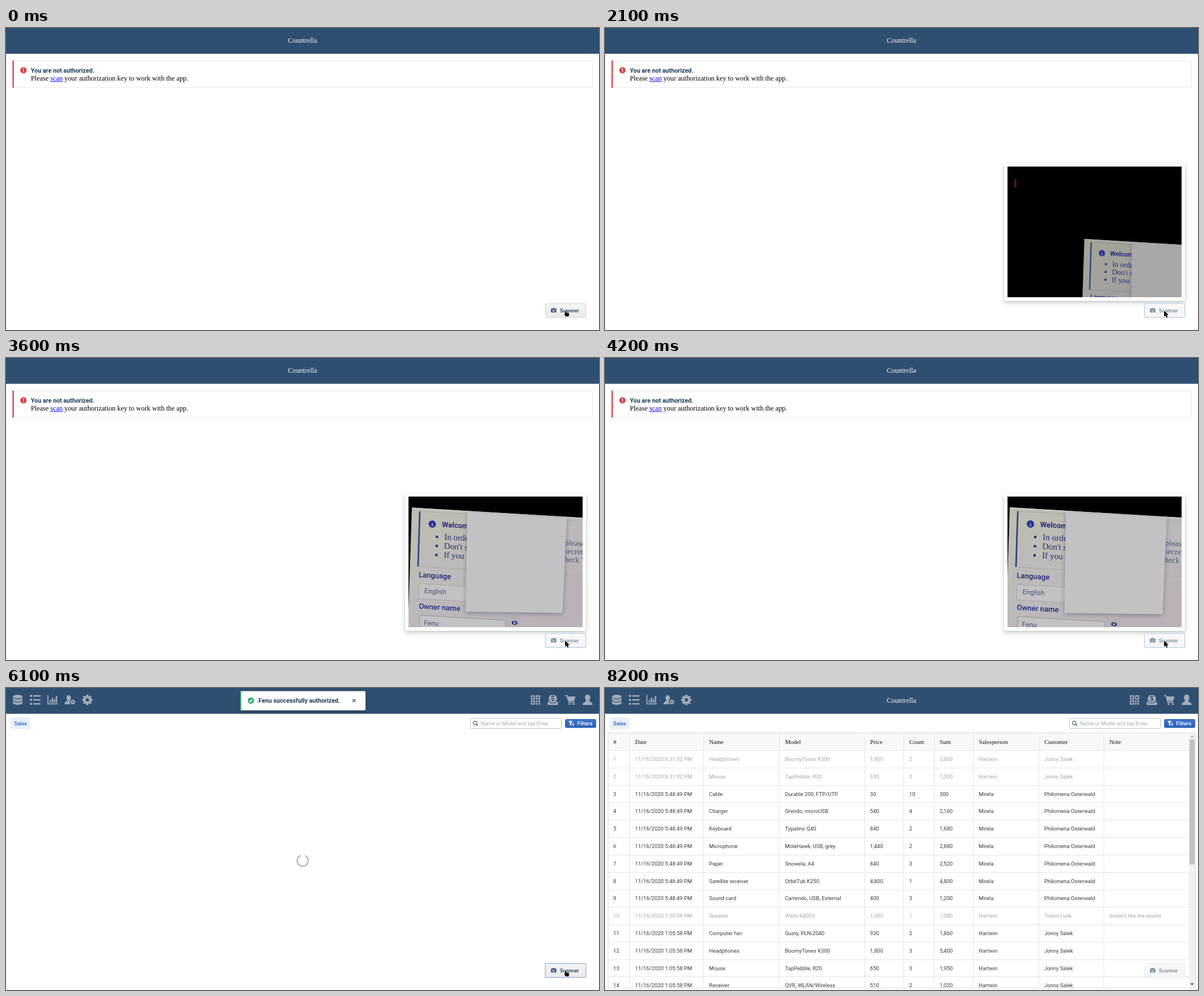
Animation of 1049 by 534 pixels, one loop 8900 ms. Source, as an HTML page with a canvas:

```html
<!DOCTYPE html>
<html lang="en">
<head>
<meta charset="utf-8">
<title>Sales scanner</title>
<style>
  html, body { margin: 0; width: 100%; height: 100%; overflow: hidden; background: #fff; }
  canvas { display: block; width: 100vw; height: 100vh; }
</style>
</head>
<body>
<canvas id="stage" width="1049" height="534"></canvas>
<script>
const ctx = document.getElementById('stage').getContext('2d');
const LOOP = 8900;
const SANS = 'Roboto, sans-serif';
const SERIF = '"Liberation Serif", serif';
const NAVY = '#2f4f72', ICON = '#a3aeba', INK = '#263f58', BLUE = '#2f66c0';
const TAU = Math.PI * 2;

// ---------- helpers ----------
function rect(x, y, w, h, color) {
  ctx.fillStyle = color;
  ctx.fillRect(x, y, w, h);
}

function box(x, y, w, h, r, fill, stroke) {
  ctx.beginPath();
  ctx.roundRect(x, y, w, h, r);
  if (fill) { ctx.fillStyle = fill; ctx.fill(); }
  if (stroke) { ctx.strokeStyle = stroke; ctx.lineWidth = 1; ctx.stroke(); }
}

function dot(x, y, r, color, ry = r) {
  ctx.beginPath();
  ctx.ellipse(x, y, r, ry, 0, 0, TAU);
  ctx.fillStyle = color;
  ctx.fill();
}

function shape(d, color) {
  ctx.fillStyle = color;
  ctx.fill(new Path2D(d));
}

function line(d, color, width) {
  ctx.strokeStyle = color;
  ctx.lineWidth = width;
  ctx.stroke(new Path2D(d));
}

function text(str, x, y, font, color, align = 'left') {
  ctx.font = font;
  ctx.textAlign = align;
  ctx.fillStyle = color;
  ctx.fillText(str, x, y);
  return ctx.measureText(str).width;
}

function at(x, y, scale, draw) {
  ctx.save();
  ctx.translate(x, y);
  ctx.scale(scale, scale);
  draw();
  ctx.restore();
}

function withShadow(color, blur, dy, draw) {
  ctx.save();
  ctx.shadowColor = color;
  ctx.shadowBlur = blur;
  ctx.shadowOffsetY = dy;
  draw();
  ctx.restore();
}

// Last step time that is not later than t
const snap = (t, steps) => steps.reduce((last, s) => (s <= t ? s : last), steps[0]);

// ---------- icons, centred on 0,0 ----------
function database() {
  dot(0, -5.7, 8.5, ICON, 3.4);
  const band = 'M-8.5 -3.6Q0 2 8.5 -3.6V.6Q0 6.2 -8.5 .6Z';
  shape(band, ICON);
  at(0, 5.6, 1, () => shape(band, ICON));
}

function list() {
  for (const y of [-7, 0, 7]) {
    dot(-7.3, y, 2.1, ICON);
    rect(-3.5, y - 1.2, 13, 2.4, ICON);
  }
}

function chart() {
  rect(-9, -8.5, 1.8, 16.5, ICON);
  rect(-9, 6.2, 18.5, 1.8, ICON);
  [5, 9, 6.5, 12].forEach((h, i) => rect(-5 + i * 3.6, 5 - h, 2.4, h, ICON));
}

function person() {
  dot(0, -4, 4.8, ICON, 5.6);
  shape('M-8.5 9V7C-8 4.5 -4 4.5 -2.8 1H2.8C4 4.5 8 4.5 8.5 7V9Z', ICON);
}

function cog() {
  ctx.beginPath();
  ctx.arc(0, 0, 4.9, 0, TAU);
  ctx.strokeStyle = ICON;
  ctx.lineWidth = 4;
  ctx.stroke();
  for (let i = 0; i < 8; i++) {
    ctx.save();
    ctx.rotate(i * TAU / 8);
    rect(-1.9, -9.2, 3.8, 3.6, ICON);
    ctx.restore();
  }
}

function personCog() {
  at(-2.2, 0, .85, person);
  dot(5.2, 3.8, 5.6, NAVY);
  at(5.2, 3.8, .48, cog);
}

function tiles() {
  ctx.strokeStyle = ICON;
  ctx.lineWidth = 2;
  for (const [x, y] of [[-7, -7], [2, -7], [-7, 2]]) ctx.strokeRect(x, y, 5.4, 5.4);
  for (const [x, y] of [[1, 1], [5.4, 1], [1, 5.4], [5.4, 5.4]]) rect(x, y, 3, 3, ICON);
}

function coin() {
  shape('M-9 3H-7L-4 6H4L7 3H9V9H-9Z', ICON);
  dot(0, -2, 8.2, NAVY);
  dot(0, -2, 7.3, ICON);
  text('$', 0, 2.2, 'bold 12px ' + SANS, NAVY, 'center');
}

function cart() {
  line('M-9 -7.5H-6L-2.3 4H7.5', ICON, 1.8);
  shape('M-5.3 -6H9.2L7 2H-3Z', ICON);
  dot(-1.2, 7.3, 1.8, ICON);
  dot(6.2, 7.3, 1.8, ICON);
}

function camera(color) {
  box(-5, -3, 10, 7, 1, color);
  rect(-2.2, -4.2, 4.4, 2, color);
  dot(0, .5, 2.4, '#f4f5f6');
  dot(0, .5, 1.4, color);
}

function funnel() {
  shape('M-5 -4.2H2.2L-.4 -.8V4.2L-2.4 2.8V-.8Z', '#fff');
  for (let i = 0; i < 3; i++) rect(1.2, -.6 + i * 1.8, 3.6, 1, '#fff');
}

// ---------- page parts ----------
function header(signedIn) {
  rect(0, 0, 1049, 45, NAVY);
  rect(0, 45, 1049, 1, '#7f93aa');
  text('Countrella', 524.5, 26, '12.29px ' + SERIF, '#f5f8fa', 'center');
  if (!signedIn) return;
  [database, list, chart, personCog, cog].forEach((icon, i) => at(20.7 + i * 30.8, 21, 1, icon));
  [tiles, coin, cart, person].forEach((icon, i) => at(936.5 + i * 30.8, 21, 1, icon));
}

function callout() {
  box(12.5, 58.5, 1025, 46.5, 0, '#fff', '#e3e6e9');
  rect(11.5, 57.6, 2.3, 48, '#db3b41');
  dot(30.8, 74.8, 5.5, '#db3b41');
  rect(30, 71.5, 1.6, 4.2, '#fff');
  rect(30, 76.6, 1.6, 1.6, '#fff');
  text('You are not authorized.', 44, 78.6, 'bold 10.75px ' + SANS, '#1c3a56');
  const font = '12.29px ' + SERIF;
  let x = 44;
  x += text('Please ', x, 93, font, '#000');
  const link = text('scan', x, 93, font, '#0000ee');
  rect(x, 94.2, link, 1, '#0000ee');
  text(' your authorization key to work with the app.', x + link, 93, font, '#000');
}

function toolbar() {
  box(8.5, 52, 34.5, 21, 2, '#e9f0f8');
  text('Sales', 14.6, 66.4, '500 9.3px ' + SANS, BLUE);

  box(821.5, 53.5, 161, 18, 2, '#fff', '#b9c2ca');
  ctx.beginPath();
  ctx.arc(830, 61.8, 3.2, 0, TAU);
  ctx.strokeStyle = '#5c7080';
  ctx.lineWidth = 1.4;
  ctx.stroke();
  line('M832.3 64.2L835 67', '#5c7080', 1.7);
  text('Name or Model and tap Enter...', 840, 66.4, '9.21px ' + SANS, '#a3abb3');

  const fill = ctx.createLinearGradient(0, 55, 0, 70);
  fill.addColorStop(0, '#3f76cf');
  fill.addColorStop(1, '#2b5fb8');
  box(989.5, 55.5, 54, 14.5, 2, fill, '#2a5cb0');
  at(1000, 62.5, 1, funnel);
  text('Filters', 1010.5, 66.3, '500 9.6px ' + SANS, '#fff');
}

function spinner(t) {
  const gaps = { 4500: 0, 4800: 255, 5100: 75, 5500: 180, 5800: 200, 6100: 272 };
  const gap = gaps[snap(t, Object.keys(gaps).map(Number))] * TAU / 360;
  ctx.beginPath();
  ctx.arc(524.8, 305.3, 9.8, gap + .5, gap + TAU - .5);
  ctx.strokeStyle = '#aab4bd';
  ctx.lineWidth = 2.2;
  ctx.lineCap = 'round';
  ctx.stroke();
  ctx.lineCap = 'butt';
}

const COLUMNS = [
  ['#', 5], ['Date', 43.5], ['Name', 174.5], ['Model', 308.8], ['Price', 459.2], ['Count', 528.5],
  ['Sum', 582.3], ['Salesperson', 651.5], ['Customer', 767.3], ['Note', 882.5]
];

const ORDERS = [
  { time: '6:31:32', seller: 'Hartwin', buyer: 'Jonny Salek', dim: true, items: [
    ['Headphones', 'BoomyTones K300', 1800, 2],
    ['Mouse', 'TapPebble, R20', 650, 2]] },
  { time: '5:48:49', seller: 'Mirela', buyer: 'Philomena Osterwald', items: [
    ['Cable', 'Durable 200, FTP/UTP', 30, 10],
    ['Charger', 'Grendo, microUSB', 540, 4],
    ['Keyboard', 'Typalino Q40', 840, 2],
    ['Microphone', 'MoleHawk, USB, grey', 1440, 2],
    ['Paper', 'Snowela, A4', 840, 3],
    ['Satellite receiver', 'OrbitTub K250', 4800, 1],
    ['Sound card', 'Carrendo, USB, External', 400, 3]] },
  { time: '1:20:06', seller: 'Hartwin', buyer: 'Toben Lusk', dim: true, note: "doesn't like the sound", items: [
    ['Speaker', 'Wails B400S', 1080, 1]] },
  { time: '1:05:58', seller: 'Hartwin', buyer: 'Jonny Salek', items: [
    ['Computer fan', 'Gusty, PLN-2040', 930, 2],
    ['Headphones', 'BoomyTones K300', 1800, 3],
    ['Mouse', 'TapPebble, R20', 650, 3],
    ['Receiver', 'QVR, WLAN/Wireless', 510, 2]] }
];

const money = n => n.toLocaleString('en-US');
const ROWS = ORDERS.flatMap(o => o.items.map(([name, model, price, count]) => ({
  dim: o.dim,
  cells: ['11/16/2020 ' + o.time + ' PM', name, model, money(price), count,
    money(price * count), o.seller, o.buyer, o.note || '']
})));

function table() {
  const top = 110, pitch = 30.8, rule = '#e3e5e7';
  ctx.save();
  ctx.beginPath();
  ctx.rect(5, 79, 1040, 452);
  ctx.clip();
  rect(5, 79, 1040, 452, '#fff');
  rect(5, 79, 1028, 31, '#f8f8f9');
  for (const [label, x] of COLUMNS) {
    text(label, x + 9.7, 99, '10.75px ' + SERIF, '#10161a');
    if (x > 5) rect(Math.floor(x), 79, 1, 452, rule);
  }
  rect(5, top, 1028, 1, rule);
  ROWS.forEach(({ dim, cells }, i) => {
    const y = top + i * pitch;
    [i + 1, ...cells].forEach((cell, c) =>
      text(cell, COLUMNS[c][1] + 9.6, y + 19, '9.5px ' + SANS, dim ? '#a3a6a9' : '#343a40'));
    rect(5, Math.round(y + pitch), 1028, 1, rule);
  });
  rect(1033, 80, 11, 450, '#f1f1f1');
  rect(1034, 91, 9, 221, '#c1c1c1');
  shape('M1035.5 87.3H1041.5L1038.5 84Z', '#a3a3a3');
  shape('M1035.5 522.3H1041.5L1038.5 525.6Z', '#404040');
  ctx.restore();
  ctx.strokeStyle = '#d8dce0';
  ctx.lineWidth = 1;
  ctx.strokeRect(5.5, 79.5, 1039, 451);
}

function scanButton({ busy, ring, hover }) {
  if (ring) box(953, 486, 74, 27, 3, busy ? '#dbe6f2' : '#c3d5ea');
  const fill = ctx.createLinearGradient(0, 487, 0, 512);
  fill.addColorStop(0, busy ? '#f8f9fa' : hover ? '#f4f5f6' : '#fbfbfc');
  fill.addColorStop(1, busy ? '#f4f5f7' : hover ? '#e9eaec' : '#f0f1f3');
  box(954.5, 487.5, 71, 24, 2, fill, busy ? (ring ? '#c5d5e6' : '#e4e7ea') : ring ? '#a9bdd3' : '#cdd2d6');
  const color = busy ? '#7d8b99' : INK;
  at(968.8, 499.2, .95, () => camera(busy ? '#73859a' : '#35557a'));
  text('Scanner', 979.8, 503.2, '500 9.21px ' + SANS, color);
}

function toast() {
  withShadow('rgba(16,22,26,.35)', 8, 2, () => box(414, 5.5, 222, 34, 2, '#fff'));
  rect(414, 5.5, 2.2, 34, '#3fa874');
  dot(433.3, 22.3, 5.6, '#3fa874');
  line('M430.6 22.4L432.6 24.4L436 20.6', '#fff', 1.5);
  text('Fenu successfully authorized.', 446.6, 26, 'bold 10.75px ' + SANS, '#1c3a56');
  line('M613 19.7L618.2 24.9M618.2 19.7L613 24.9', '#5c7080', 1.6);
}

// ---------- camera view ----------
// time, corner x, corner y, scale, brightness
const POSES = [
  [2100, 848, 373, .86, 164], [2800, 796, 314, .935, 208], [3100, 757, 276, .96, 204],
  [3400, 737, 264, .98, 196], [3600, 718, 264.5, 1, 190], [3900, 716, 264, 1.01, 190], [4200, 716, 264, 1.015, 190]
];
const VIDEO_STEPS = [2100, 2200, 2300, 2400, 2500, 2800, 3100, 3400, 3600, 3900, 4200];

function poseAt(t) {
  const i = Math.max(1, POSES.findIndex(p => p[0] >= t));
  const a = POSES[i - 1], b = POSES[i];
  const k = (t - a[0]) / (b[0] - a[0]);
  return a.map((v, j) => v + (b[j] - v) * k);
}

function video(t) {
  const now = snap(t, VIDEO_STEPS);
  const [, x, y, s, lum] = poseAt(now);
  const grey = d => `rgb(${lum + d},${lum + d - 3},${lum + d})`;
  const ink = '#23277a', soft = '#4a5078';
  ctx.save();
  ctx.beginPath();
  ctx.rect(712, 245, 308, 231);
  ctx.clip();
  rect(712, 245, 308, 231, '#000');
  if (now < 2500) box(724, 267, 4, 15, 2, '#451a20');

  ctx.transform(s, s * .06, -s * .033, s, x, y);
  const tint = ctx.createLinearGradient(0, 0, 140, 220);
  tint.addColorStop(0, `rgb(${lum - 2},${lum + 1},${lum - 16})`);
  tint.addColorStop(.6, grey(-2));
  tint.addColorStop(1, `rgb(${lum - 4},${lum - 12},${lum - 6})`);
  rect(0, 0, 400, 300, tint);
  rect(0, 0, 400, 1.5, grey(18));

  // Welcome notice
  ctx.strokeStyle = grey(-20);
  ctx.lineWidth = 1;
  ctx.strokeRect(13, 6, 300, 97);
  rect(13, 6, 2.6, 97, '#343c85');
  dot(37, 27, 6.5, '#2b2f96');
  text('i', 37, 31, 'bold 10px ' + SERIF, grey(20), 'center');
  text('Welcome', 54, 31, 'bold 13px ' + SANS, ink);
  ['In order', "Don't share", 'If you'].forEach((str, i) => {
    rect(44, 47 + i * 16, 4, 4, ink);
    text(str, 59, 53 + i * 16, '15px ' + SERIF, ink);
  });
  ['please', 'secret', 'check "'].forEach((str, i) =>
    text(str, i === 2 ? 266 : 272, 50 + i * 14.7, '14px ' + SERIF, soft));

  // Form fields
  const label = '500 13px ' + SANS;
  text('Language', 16, 122, label, ink);
  box(17, 133, 150, 27, 2, grey(6), grey(-24));
  text('English', 27, 149.5, '12px ' + SANS, soft);
  text('Owner name', 18, 177.5, label, ink);
  box(20, 189, 152, 27, 2, grey(6), grey(-40));
  text('Fenu', 28, 206, '12px ' + SANS, soft);
  box(174, 182, 24, 26, 2, grey(-10));
  dot(188, 192.5, 5, ink, 3.4);
  dot(188, 192.5, 2, grey(0));

  // Blank card in front
  withShadow('rgba(30,30,60,.35)', 8, 2, () => shape('M98 2H274L272 170L101 178Z', grey(6)));
  ctx.restore();
}

function popover(t) {
  ctx.save();
  ctx.globalAlpha = Math.min(1, (snap(t, [800, 900, 1000, 1100]) - 700) / 400);
  const panel = () => box(706, 239, 320, 243.5, 2, '#fff');
  withShadow('rgba(16,22,26,.2)', 9, 3.5, panel);
  withShadow('rgba(16,22,26,.14)', 3, 1, panel);
  ctx.restore();
  if (t >= 2100) video(t);
}

// ---------- pointer ----------
function arrow() {
  const d = 'M0 0V11L2.6 8.8L4.4 12.8L6.3 12L4.6 8.1H8Z';
  ctx.lineJoin = 'round';
  line(d, '#fff', 1.6);
  shape(d, '#000');
}

function hand() {
  const d = 'M2 0C3 0 3.2 .8 3.2 1.6V4L7.2 4.6C8 4.8 8.3 5.4 8.2 6.2L7.4 10.6H2.4L-.6 6.8C-1 6 0 5.4 .9 6.2V1.4C.9 .6 1.2 0 2 0Z';
  ctx.lineJoin = 'round';
  line(d, '#fff', 1.2);
  shape(d, '#000');
}

function pointer(t) {
  if (t >= 8200) return;
  const stops = [
    [0, 988, 499.5, hand], [800, 989, 499.5, arrow], [4500, 988, 499.5, hand], [7000, 945, 433.5, arrow],
    [7200, 739, 149.5, arrow], [7400, 634, 36.5, arrow], [7600, 612, 31.5, arrow], [7800, 607, 24, hand]
  ];
  const [, x, y, draw] = stops.filter(s => s[0] <= t).pop();
  at(x, y, 1, draw);
}

// ---------- timeline ----------
function render(t) {
  const signedIn = t >= 4500;
  const scanning = t >= 800 && t < 4500;
  rect(0, 0, 1049, 534, '#fff');
  header(signedIn);
  if (signedIn) {
    toolbar();
    if (t < 6400) spinner(t);
    else table();
  } else {
    callout();
  }
  if (scanning) popover(t);
  scanButton({
    busy: scanning || t >= 8200,
    ring: t >= 800 && t < 8200,
    hover: t < 7000
  });
  if (t >= 5800 && t < 8200) toast();
  pointer(t);
}

const start = performance.now();
function tick() {
  render((performance.now() - start) % LOOP);
  requestAnimationFrame(tick);
}
tick();
</script>
</body>
</html>
```
